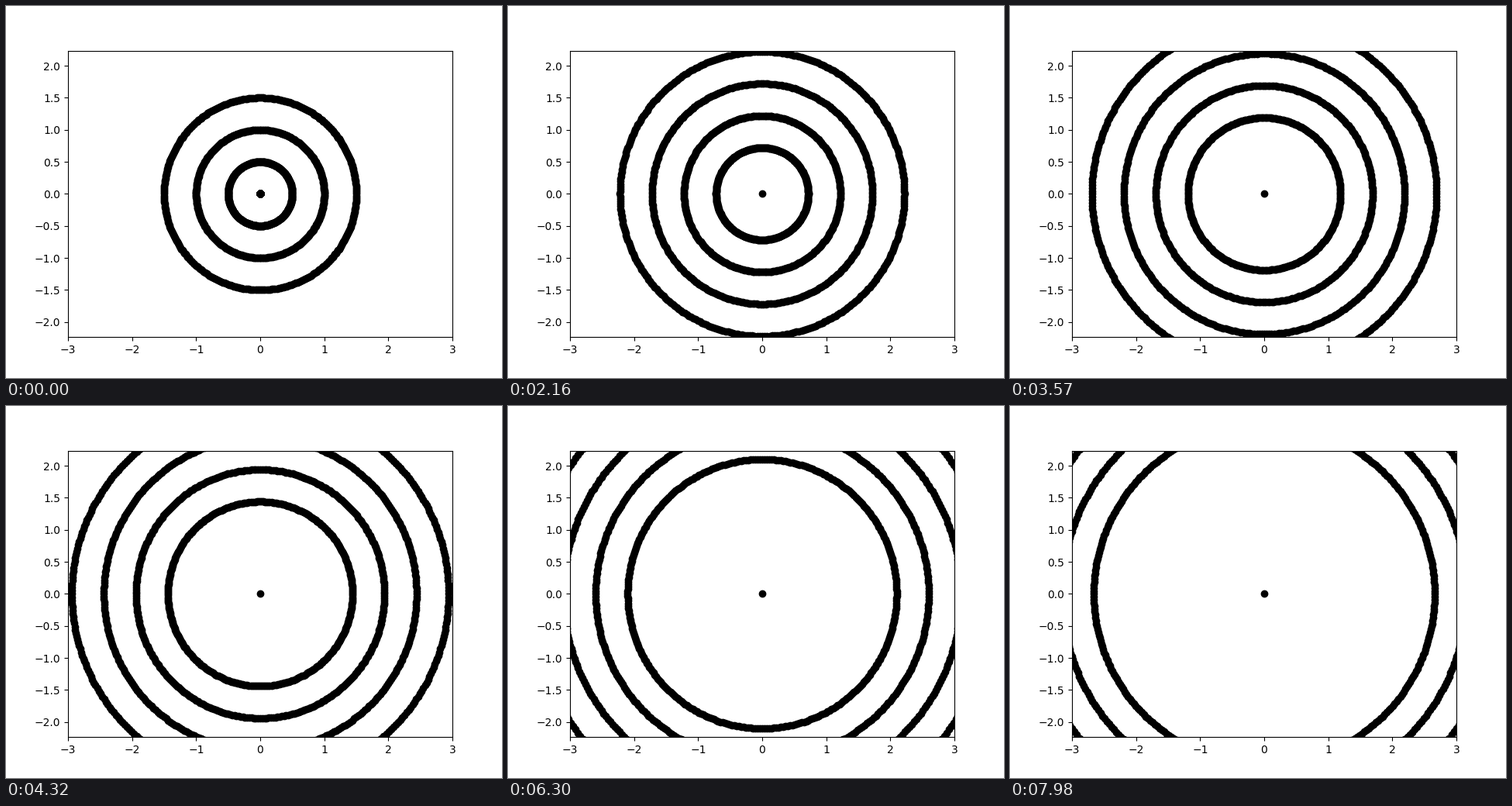
These frames come from a looping animation (640 by 480 pixels, 8 s). A matplotlib script:

```python
import numpy as np
import matplotlib.pyplot as plt
from matplotlib.animation import FuncAnimation

LOOP_MS = 8000
FRAMES = 267
SPEED = 0.01                               # radius gained per frame
START_RADII = np.array([0, 0.5, 1, 1.5])   # one entry per wavefront
PARTICLES = 360

angles = np.linspace(0, 2 * np.pi, PARTICLES, endpoint=False)
directions = np.stack([np.cos(angles), np.sin(angles)])

fig, ax = plt.subplots(figsize=(6.4, 4.8), dpi=100)
half_height = 3 * (0.77 * 4.8) / (0.775 * 6.4)   # equal scale on both axes
ax.set_xlim(-3, 3)
ax.set_ylim(-half_height, half_height)

waves, = ax.plot([], [], "ko")
ax.plot([0], [0], "ko")


def update(frame):
    radii = START_RADII + SPEED * frame
    x, y = (np.outer(radii, d).ravel() for d in directions)
    waves.set_data(x, y)
    return waves,


anim = FuncAnimation(fig, update, frames=FRAMES, interval=LOOP_MS / FRAMES,
                     repeat=True, repeat_delay=0)
plt.show()
```
